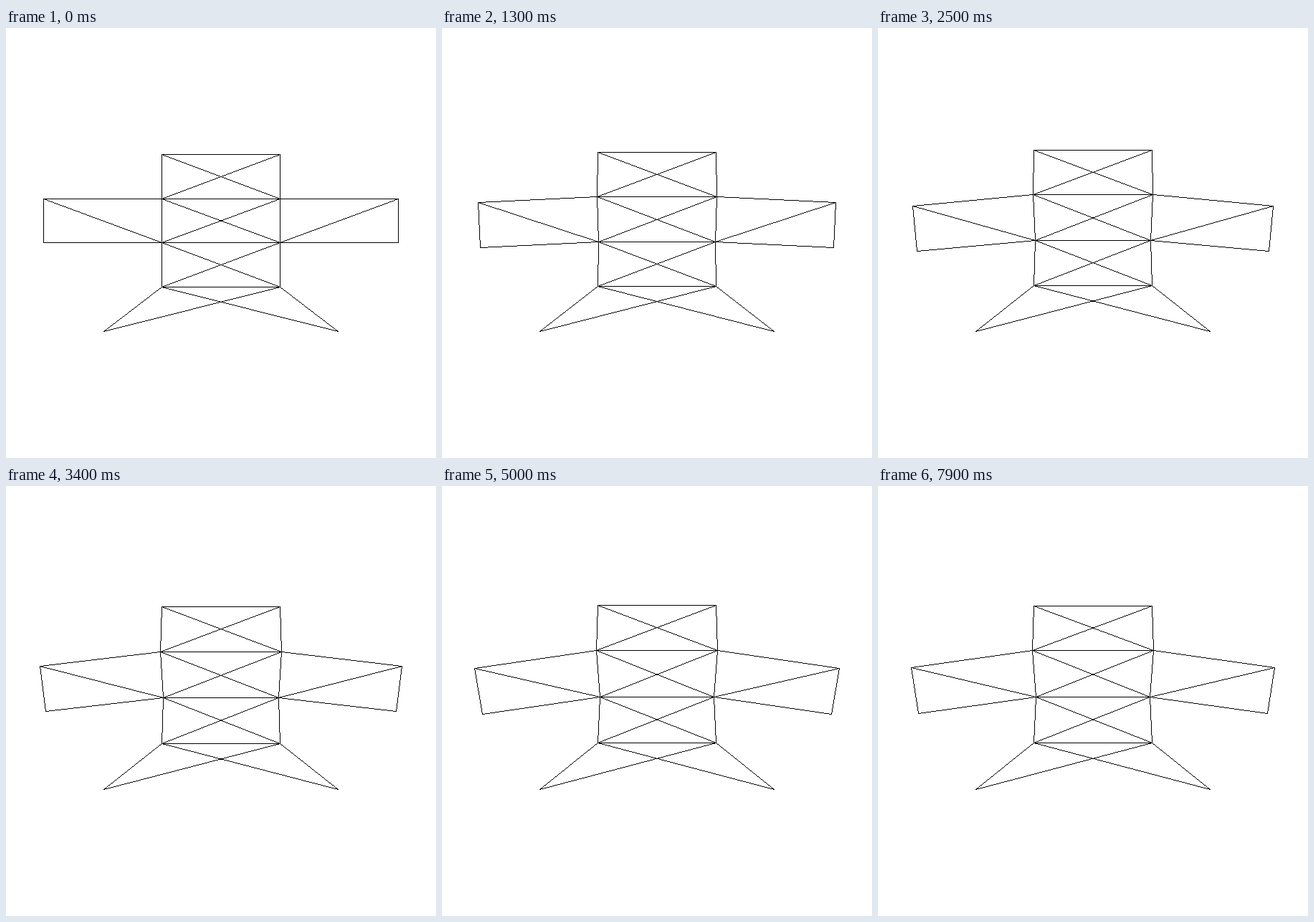
Recreate the animation shown at these times as an HTML page with a canvas. Size 600 by 600 pixels, loop 8 s.

```html
<!DOCTYPE html>
<html lang="en">
<head>
<meta charset="utf-8">
<title>Swaying truss</title>
<style>
  html, body { margin: 0; width: 100%; height: 100%; overflow: hidden; background: #fff; }
  canvas { display: block; width: 600px; height: 600px; }
</style>
</head>
<body>
<canvas id="stage" width="600" height="600"></canvas>
<script>
const ctx = document.getElementById("stage").getContext("2d");
const LOOP = 8000, STEP = 100, QUARTER = 6150;

// Left-hand joints: rest x, rest y, sway x, sway y
const joints = {
  top:      [217.5, 176.55, 0, -10.28],
  shoulder: [217.5, 238.33, -2, -9.5],
  waist:    [217.5, 299.9, 3, -5.6],
  hip:      [217.5, 361.7, 0, -3.5],
  foot:     [136.2, 423.2, 0, 0],
  armHigh:  [52.5, 238.33, -7.15, 17.2],
  armLow:   [52.5, 299.9, 4, 19.1]
};

// Bars within one side, then bars from one side to the other
const sideBars = [
  ["top", "shoulder"], ["shoulder", "waist"], ["waist", "hip"], ["hip", "foot"],
  ["armHigh", "shoulder"], ["armLow", "waist"], ["armHigh", "armLow"], ["armHigh", "waist"]
];
const crossBars = [
  ["top", "top"], ["shoulder", "shoulder"], ["waist", "waist"], ["hip", "hip"],
  ["top", "shoulder"], ["shoulder", "waist"], ["waist", "hip"], ["hip", "foot"]
];

// One-pixel line without smoothing, drawn with its mirror image
function drawBar([x0, y0], [x1, y1]) {
  const n = Math.max(Math.abs(x1 - x0), Math.abs(y1 - y0));
  for (let i = 0; i <= n; i++) {
    const x = Math.round(x0 + (x1 - x0) * i / n);
    const y = Math.round(y0 + (y1 - y0) * i / n);
    ctx.fillRect(x, y, 1, 1);
    ctx.fillRect(599 - x, y, 1, 1);
  }
}

function draw(time) {
  const sway = Math.sin(Math.PI / 2 * time / QUARTER);
  const left = name => {
    const [x, y, dx, dy] = joints[name];
    return [Math.floor(x + dx * sway), Math.floor(y + dy * sway)];
  };
  const right = name => {
    const [x, y] = left(name);
    return [599 - x, y];
  };
  ctx.fillStyle = "#fff";
  ctx.fillRect(0, 0, 600, 600);
  ctx.fillStyle = "#000";
  for (const [a, b] of sideBars) drawBar(left(a), left(b));
  for (const [a, b] of crossBars) drawBar(left(a), right(b));
}

const start = performance.now();
function tick() {
  const time = (performance.now() - start) % LOOP;
  draw(Math.floor(time / STEP) * STEP);
  requestAnimationFrame(tick);
}
tick();
</script>
</body>
</html>
```
